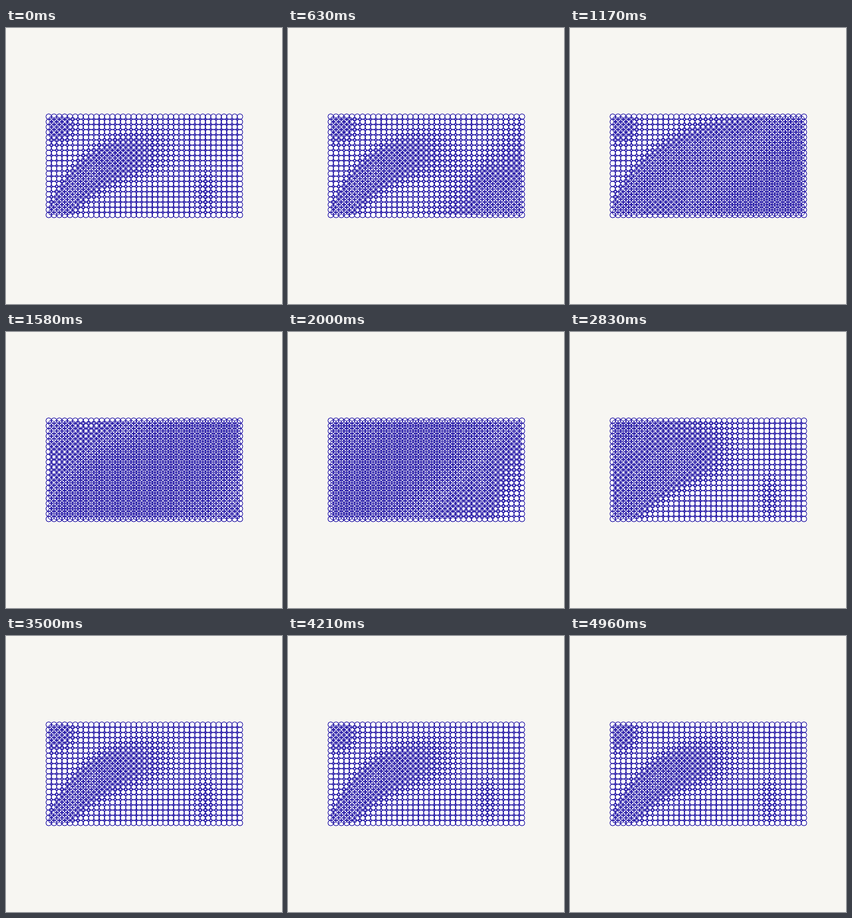
Animation, 400 px wide and 400 px high, one loop 5 s. Source, as an HTML page with a canvas:

```html
<!DOCTYPE html>
<html lang="en">
<head>
<meta charset="utf-8">
<title>Circle lattice</title>
<style>
  html, body { margin: 0; width: 100%; height: 100%; overflow: hidden; background: #f7f6f2; }
  canvas { display: block; }
</style>
</head>
<body>
<canvas id="stage" width="400" height="400"></canvas>
<script>
const ctx = document.getElementById('stage').getContext('2d');
const LOOP = 5000, LEAD = 150, SPREAD = 1600, PULSE = 2200;
const COLS = 37, ROWS = 20, DX = 7.7, DY = 7.5;
const LEFT = 61.9, TOP = 128.5;
const WIDTH = (COLS - 1) * DX, HEIGHT = (ROWS - 1) * DY;
const R = 4, R_MIN = 0.9, R_MAX = 5;

const hump = d => Math.exp(-(Math.abs(d) ** 3));

// Resting swell: a bent ridge that fades to the right, a corner and a spot
function swell(x, y) {
  const ridge = 172 + 105 * Math.exp((70 - x) / 55);
  const fade = Math.max(0, 1 - ((x - 60) / 210) ** 3);
  return Math.max(
    0.8 * fade * hump((y - ridge) / 42),
    0.72 * hump(Math.hypot(x - 72, y - 140) / 34),
    0.45 * hump(Math.hypot((x - 289) / 20, (y - 238) / 42))
  );
}

function lattice(cols, rows, x0, y0) {
  const points = [];
  for (let j = 0; j < rows; j++)
    for (let i = 0; i < cols; i++) points.push({ x: x0 + i * DX, y: y0 + j * DY });
  return points;
}

const outer = lattice(COLS, ROWS, LEFT, TOP);
const inner = lattice(COLS - 1, ROWS - 1, LEFT + DX / 2, TOP + DY / 2);
for (const p of inner) {
  p.rest = swell(p.x, p.y);
  // The pulse runs diagonally from bottom right to top left
  const way = 1 - (p.x - LEFT + p.y - TOP) / (WIDTH + HEIGHT);
  p.delay = SPREAD * way - LEAD;
}

function circle(x, y, r) {
  ctx.beginPath();
  ctx.arc(x, y, r, 0, Math.PI * 2);
}

function draw(t) {
  ctx.fillStyle = '#f7f6f2';
  ctx.fillRect(0, 0, 400, 400);
  ctx.fillStyle = '#fff';
  ctx.fillRect(LEFT, TOP, WIDTH, HEIGHT);
  for (const p of outer) {
    circle(p.x, p.y, R);
    ctx.fill();
  }

  // Separate strokes, so that overlaps darken
  ctx.strokeStyle = '#1507a0';
  ctx.lineWidth = 1;
  for (const p of outer) {
    circle(p.x, p.y, R);
    ctx.stroke();
  }
  for (const p of inner) {
    const phase = Math.min(1, ((t - p.delay + LOOP) % LOOP) / PULSE);
    const v = p.rest + (1 - p.rest) * Math.sin(Math.PI * phase);
    circle(p.x, p.y, R_MIN + (R_MAX - R_MIN) * v);
    ctx.stroke();
  }
}

const start = performance.now();
function frame() {
  draw((performance.now() - start) % LOOP);
  requestAnimationFrame(frame);
}
frame();
</script>
</body>
</html>
```
